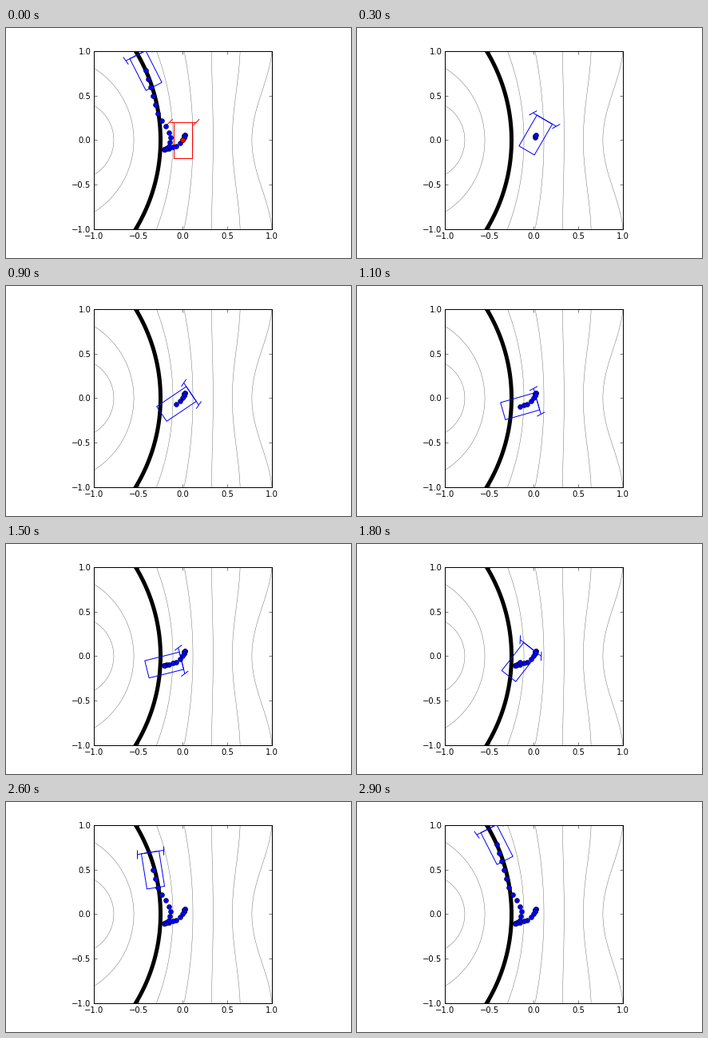
Recreate the animation shown at these times as a matplotlib script. Size 432 by 288 pixels, loop 3000 ms.

```python
import numpy as np
import matplotlib.pyplot as plt
from matplotlib.animation import FuncAnimation

plt.rcParams.update({
    "font.family": "DejaVu Sans", "font.size": 10,
    "axes.linewidth": 1.0, "lines.linewidth": 1.0,
    "lines.markersize": 6, "lines.markeredgewidth": 0.5,
    "lines.solid_capstyle": "butt", "path.simplify": False,
})

STEPS = 30
LENGTH, WIDTH, AXLE, WHEEL = 0.4, 0.2, 0.3, 0.1

# Key poses of the manoeuvre: step, x, y, heading, steering (degrees).
KEYS = np.array([
    (0, 0, 0, 90, -45),
    (4, .020, .057, 56, -22),
    (7, -.005, .001, 63, 17),
    (9, -.071, -.065, 34, 22),
    (11, -.154, -.091, 16, 12),
    (14, -.212, -.100, 9, 18),
    (18, -.158, -.066, 52, 35),
    (20, -.142, .026, 98, 25),
    (22, -.191, .152, 118.5, 15),
    (24, -.279, .299, 120, -4),
    (26, -.335, .495, 99, -9),
    (29, -.415, .780, 117, 9),
])


def smooth_poses(keys):
    """Cubic Hermite curve through the key poses, one row per step."""
    t, values = keys[:, 0], keys[:, 1:]
    slopes = np.gradient(values, t, axis=0, edge_order=2)
    steps = np.arange(STEPS)
    k = np.clip(np.searchsorted(t, steps, "right") - 1, 0, len(t) - 2)
    span = (t[k + 1] - t[k])[:, None]
    u = (steps - t[k])[:, None] / span
    ease = u * u * (3 - 2 * u)
    return ((1 - ease) * values[k] + ease * values[k + 1]
            + span * u * (1 - u) * ((1 - u) * slopes[k] - u * slopes[k + 1]))


POSES = smooth_poses(KEYS)
PATH = POSES[:, :2]
HEADING, STEERING = np.radians(POSES[:, 2:]).T


def rotate(points, angle):
    c, s = np.cos(angle), np.sin(angle)
    return np.asarray(points) @ np.array([[c, s], [-s, c]])


class Car:
    """Body outline, front axle and two steered wheels."""

    def __init__(self, ax, color):
        self.lines = [ax.plot([], [], color=color, zorder=3)[0]
                      for _ in range(4)]

    def place(self, step):
        l, w, a = LENGTH / 2, WIDTH / 2, AXLE / 2
        wheel = rotate([(-WHEEL / 2, 0), (WHEEL / 2, 0)], STEERING[step])
        parts = [
            [(-l, -w), (l, -w), (l, w), (-l, w), (-l, -w)],
            [(l, -a), (l, a)],
            wheel + (l, -a),
            wheel + (l, a),
        ]
        for line, part in zip(self.lines, parts):
            line.set_data(*(rotate(part, HEADING[step]) + PATH[step]).T)

    def show(self, visible):
        for line in self.lines:
            line.set_visible(visible)


Y = np.linspace(-1.04, 1.04, 81)


def arc(ax, mid, shift, height=1.0, **style):
    """Circle arc through (mid, 0) and (mid + shift, +-height)."""
    radius = (shift ** 2 + height ** 2) / (2 * abs(shift))
    y = Y * height
    x = mid + np.sign(shift) * (radius - np.sqrt(radius ** 2 - y ** 2))
    ax.plot(x, y, zorder=1, **style)


def wave(ax, mid, shift, **style):
    """S-shaped level line through (mid, 0) and (mid + shift, +-1)."""
    rise = np.sin(np.pi * Y / 2.2) ** 2 / np.sin(np.pi / 2.2) ** 2
    ax.plot(mid + shift * rise, Y, zorder=1, **style)


fig = plt.figure(figsize=(6, 4), dpi=72, facecolor="white")
side = 0.775 * 288
ax = fig.add_axes([(221.4 - side / 2) / 432, 0.125, side / 432, 0.775])
ax.set(xlim=(-1, 1), ylim=(-1, 1))
ticks = np.linspace(-1, 1, 5)
ax.set_xticks(ticks)
ax.set_yticks(ticks)
ax.tick_params(direction="in", top=True, right=True,
               length=4, width=0.5, pad=4)
ax.tick_params(axis="y", pad=3.4)

thin = dict(color="0.4", lw=0.45)
arc(ax, -0.775, -0.225, 0.39, **thin)
arc(ax, -0.55, -0.45, 0.81, **thin)
arc(ax, -0.111, -0.185, **thin)
arc(ax, 0.113, -0.099, **thin)
wave(ax, 0.340, -0.017, **thin)
wave(ax, 0.555, 0.088, **thin)
wave(ax, 0.775, 0.225, **thin)
arc(ax, -0.25, -0.28, color="k", lw=5)

car = Car(ax, "b")
start_car = Car(ax, "r")
start_car.place(0)
trail, = ax.plot([], [], "o", color="b", mec="k", zorder=4)
start_dot, = ax.plot([0], [0], "o", color="r", mec="k", zorder=5)


def draw(i):
    # The opening frame shows the finished run with the start pose on top.
    step = i if i else STEPS - 1
    car.place(step)
    trail.set_data(*PATH[1:step + 1].T)
    start_car.show(i == 0)
    start_dot.set_visible(i == 0)
    return car.lines + start_car.lines + [trail, start_dot]


anim = FuncAnimation(fig, draw, frames=STEPS, interval=100,
                     repeat=True, repeat_delay=0, blit=False)
plt.show()
```
